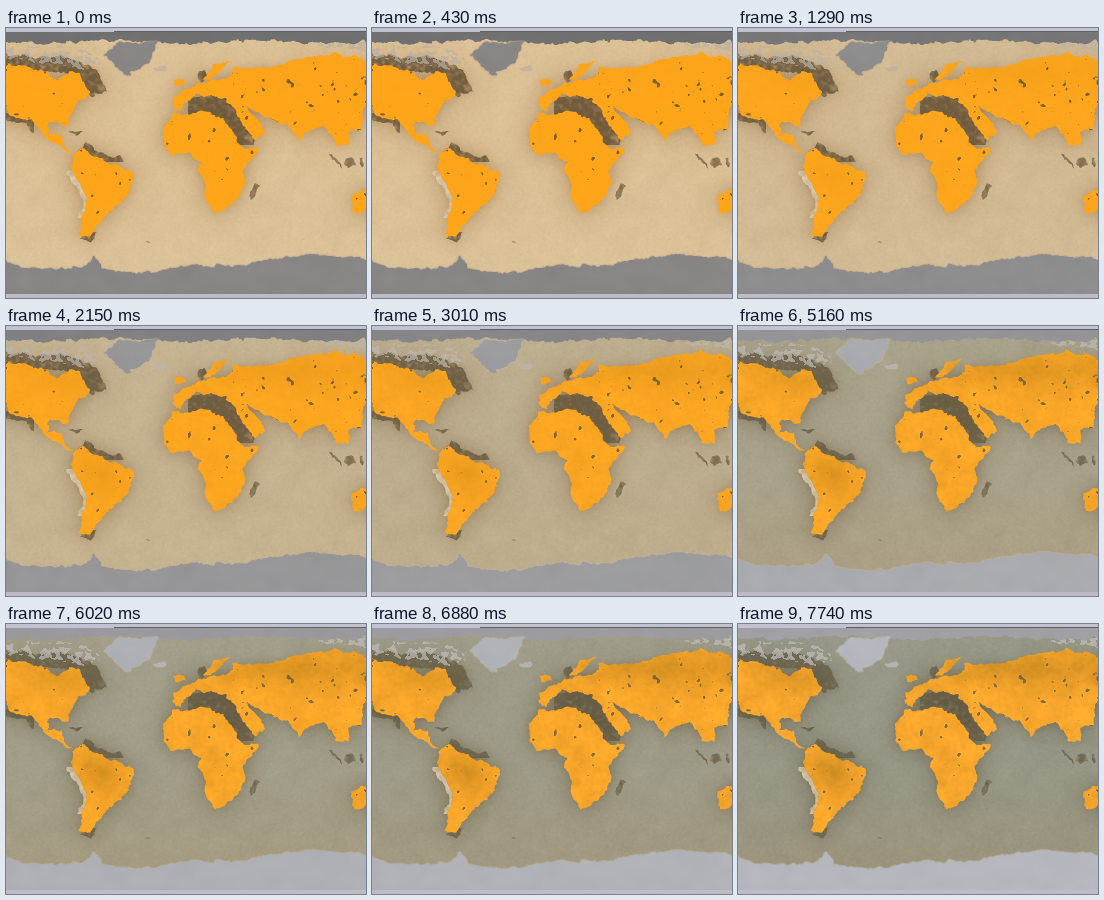
Write a matplotlib script that moves like this. It is 360x270 px and loops after 8000 ms.

```python
import numpy as np
import matplotlib.pyplot as plt
from matplotlib.animation import FuncAnimation
from matplotlib.path import Path

W, H, SS = 360, 270, 3
LOOP, TICK, HOLD = 8000, 50, 430
rng = np.random.default_rng(4)


def blur(a, sigma):
    r = int(3 * sigma) + 1
    k = np.exp(-0.5 * (np.arange(-r, r + 1) / sigma) ** 2)
    k /= k.sum()
    for axis in (0, 1):
        pad = [(0, 0), (0, 0)]
        pad[axis] = (r, r)
        p = np.pad(a, pad, mode="edge")
        n = a.shape[axis]
        a = sum(c * np.take(p, range(i, i + n), axis) for i, c in enumerate(k))
    return a


def noise(sigma, scale=1):
    n = blur(rng.standard_normal((H * scale, W * scale)), sigma)
    return n / n.std()


# Supersampled grid, warped so that plain outlines turn into ragged coasts
Y, X = (np.mgrid[0:H * SS, 0:W * SS] + 0.5) / SS
X, Y = (g + 0.5 * noise(3, SS) + 0.8 * noise(8, SS) for g in (X, Y))
rows, cols = np.mgrid[0:H, 0:W]
grain, mottle, coarse = noise(0.7), noise(1.4), noise(5)


def shrink(m):
    return m.reshape(H, SS, W, SS).mean(axis=(1, 3))


def shape(*polys, dx=0, dy=0):
    """Coverage of the union of polygons given as flat x, y lists."""
    m = np.zeros(X.shape, bool)
    for flat in polys:
        p = np.reshape(flat, (-1, 2)) + (dx, dy)
        x0, y0 = np.maximum((p.min(0) - 6) * SS, 0).astype(int)
        x1, y1 = ((p.max(0) + 6) * SS).astype(int)
        box = np.s_[y0:y1, x0:x1]
        pts = np.column_stack([X[box].ravel(), Y[box].ravel()])
        m[box] |= Path(p).contains_points(pts).reshape(X[box].shape)
    return shrink(m.astype(float))


def oval(x, y, rx, ry, lean=0):
    u, v = X - x, Y - y
    return shrink((((u - lean * v) / rx) ** 2 + (v / ry) ** 2 < 1) * 1.0)


def glow(x, y, rx, ry):
    return np.exp(-0.5 * (((cols - x) / rx) ** 2 + ((rows - y) / ry) ** 2))


def union(*masks):
    return np.max(masks, axis=0)


north_america = [
    -6, 36, 36, 42, 50, 52, 63, 44, 74, 45, 84, 64, 72, 74, 63, 90, 63, 98,
    42, 95, 41, 107, 56, 105, 55, 112, 67, 126, 40, 110, 25, 91, 7, 88, -6, 78]
south_america = [
    67, 129, 76, 119, 88, 129, 108, 136, 128, 146, 123, 166, 104, 184,
    90, 199, 82, 209, 72, 208, 77, 188, 82, 170, 66, 143]
africa = [
    157, 101, 168, 86, 196, 83, 217, 90, 227, 104, 236, 120, 253, 120,
    237, 143, 238, 158, 229, 172, 217, 184, 207, 186, 199, 168, 200, 158,
    193, 143, 194, 133, 180, 126, 165, 126, 157, 115]
eurasia = [
    167, 80, 168, 70, 176, 64, 194, 55, 222, 50, 228, 40, 264, 39, 285, 32,
    330, 26, 366, 33, 366, 72, 355, 85, 356, 99, 342, 104, 343, 116,
    332, 117, 318, 96, 304, 102, 293, 114, 282, 97, 266, 93, 246, 80,
    222, 71, 190, 66, 173, 82]
scandinavia = [197, 50, 208, 37, 226, 34, 214, 43, 205, 52]
britain = [168, 50, 175, 51, 180, 57, 170, 58]
arabia = [220, 68, 240, 76, 261, 106, 247, 113, 236, 94]
australia = [345, 168, 366, 157, 366, 183, 348, 186]
canada = [-6, 28, 62, 29, 92, 42, 101, 64, 84, 68, 68, 46, -6, 40]
greenland = [97, 27, 113, 15, 151, 14, 143, 35, 120, 48, 108, 34]

orange = shape(north_america, south_america, africa, eurasia, scandinavia,
               britain, arabia, australia)

# Bare rims are the continents shifted and cut to a stretch of coast
bare = union(
    shape(canada),
    shape(south_america, dx=4, dy=-5) * (rows < 134),
    shape(south_america, dx=2, dy=4) * (rows > 203),
    shape(north_america, dx=-6, dy=5) * (rows > 84) * (cols < 28),
    oval(203, 112, 44, 45) * (cols > 181) * (rows < 117),
    oval(196, 48, 4, 5))
pale = shape(south_america, dx=-5, dy=2) * (rows > 142) * (rows < 190)
pale = pale * (1 - orange)
isles = union(oval(248, 163, 3, 8, -0.4), oval(329, 132, 2, 8, 0.8),
              oval(344, 134, 5, 6), oval(355, 134, 2, 5),
              oval(69, 105, 7, 1.5), oval(142, 214, 2, 1))

# Ice: a wavy southern shore with one peninsula, and a polar strip
shore = 239 - 6 * np.sin(X / 62 + 2.6) - X / 60 + 2 * np.sin(X / 17)
shore -= 12 * np.exp(-((X - 89) / 7) ** 2)
ice = union(shrink((Y > shore) * 1.0), shape(greenland))
rim = np.clip(blur(ice, 0.8) * (1 - ice) * 2, 0, 1)
pole = shrink((Y < 14 + 1.5 * np.sin(X / 23)) * 1.0)
frost_mask = union(
    oval(154, 41, 6, 2.5),
    (mottle > 0.4) * shape([-6, 19, 75, 18, 94, 34, 80, 41, -6, 29]),
    (mottle > -0.5) * shape([308, 17, 366, 14, 366, 22, 335, 21]))

land = union(orange, bare, pale)
halo = np.clip(0.25 * blur(land, 4) + 0.75 * blur(land, 13), 0, 1)
halo *= np.clip((rows - 15) / 40, 0.3, 1)

gap_field = mottle + 0.7 * glow(305, 68, 35, 14) + 0.5 * glow(40, 62, 35, 15)
gaps = np.clip((gap_field - 2.1) * 2, 0, 1)
forest = np.clip(glow(300, 44, 75, 13) + 0.8 * glow(50, 50, 30, 12)
                 + glow(93, 146, 17, 15) + 0.3 * glow(208, 140, 12, 18), 0, 1)
tint = 0.2 * coarse + 0.15 * mottle - 1.5 * forest


def lay(img, color, mask, shade=0):
    tone = np.array(color, float) + np.multiply.outer(shade, np.ones(3))
    m = mask[..., None]
    return img * (1 - m) + tone * m


def world(sea, south, coast, ground, people, sheet, polar, frost, edge, relief):
    img = np.ones((H, W, 3)) * sea
    img = lay(img, south, np.clip((rows - 140) / 90, 0, 1))
    img = lay(img, coast, halo)
    img += (1.2 * grain + coarse)[..., None]
    img = lay(img, polar, pole, coarse)
    img = lay(img, ground, bare * np.clip(0.75 + 0.2 * mottle, 0.2, 1),
              9 * mottle)
    img = lay(img, frost, frost_mask * 0.7)
    img = lay(img, ground, isles * 0.6, 14 * mottle)
    img = lay(img, (214, 196, 163), pale * 0.85, 8 * mottle)
    img = lay(img, edge, rim * 0.8)
    img = lay(img, sheet, ice, coarse)
    m = orange[..., None]
    shade = np.multiply.outer(relief * tint, (1, 0.65, 0.3))
    img = img * (1 - m) + (np.array(people) + shade) * m
    img = lay(img, ground, gaps * orange * 0.8)
    img[:4] = (193, 193, 208)
    img[3, 108:] = 95
    img[266:] = (190, 187, 198)
    return np.clip(img, 0, 255)


early = world(sea=(219, 191, 149), south=(219, 193, 152),
              coast=(170, 136, 90), ground=(98, 79, 52),
              people=(254, 165, 26), sheet=(135, 134, 133),
              polar=(112, 112, 113), frost=(184, 176, 164),
              edge=(176, 160, 134), relief=1)
late = world(sea=(148, 150, 135), south=(151, 146, 124),
             coast=(108, 101, 78), ground=(100, 92, 68),
             people=(249, 168, 46), sheet=(183, 185, 192),
             polar=(163, 163, 167), frost=(192, 190, 188),
             edge=(208, 202, 186), relief=23)

fig = plt.figure(figsize=(W / 100, H / 100), dpi=100)
ax = fig.add_axes([0, 0, 1, 1])
ax.axis("off")
view = ax.imshow(early.astype(np.uint8), interpolation="nearest",
                 aspect="auto")


def update(i):
    step = int((i + 0.5) * TICK // HOLD)
    s = step / (LOOP // HOLD)
    w = s * (1.2 - 0.2 * s)
    view.set_data((early + (late - early) * w).round().astype(np.uint8))
    return [view]


anim = FuncAnimation(fig, update, frames=LOOP // TICK, interval=TICK,
                     repeat=True, repeat_delay=0, blit=False)
plt.show()
```
